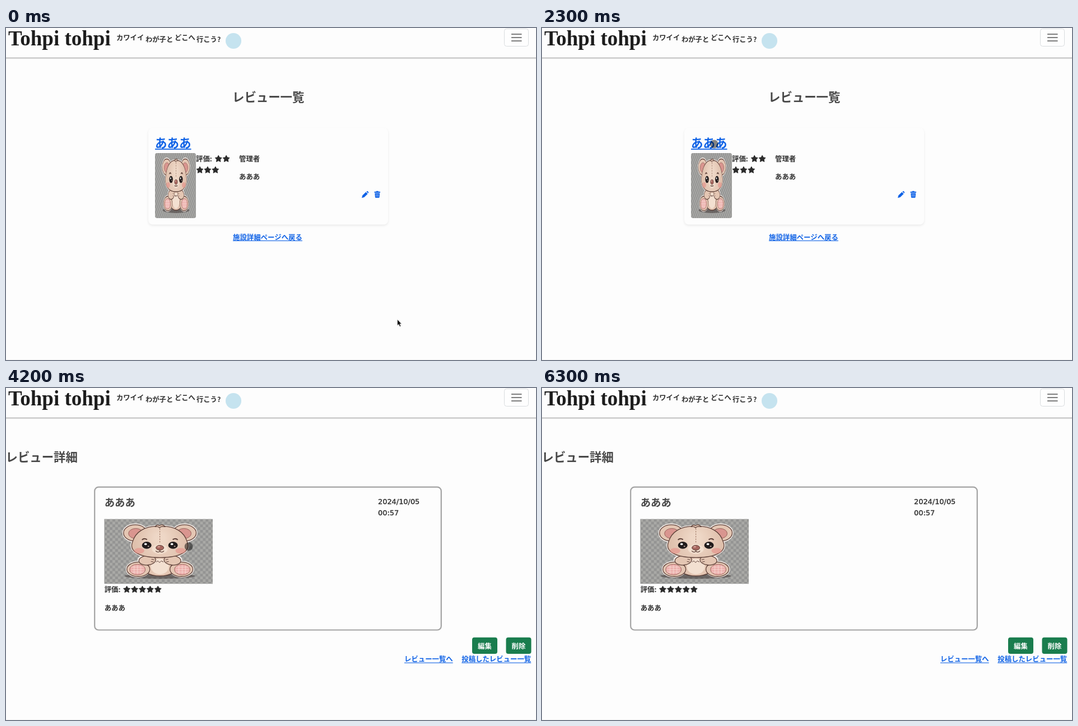
These frames come from a looping animation (946 by 592 pixels, 6.4 s). An HTML page with a canvas:

```html
<!DOCTYPE html>
<html lang="ja">
<head>
<meta charset="utf-8">
<title>レビュー</title>
<style>
html, body { margin: 0; width: 100%; height: 100%; overflow: hidden; background: #fdfdfd; }
canvas { display: block; }
</style>
</head>
<body>
<canvas id="stage" width="946" height="592"></canvas>
<script>
const ctx = document.getElementById('stage').getContext('2d');
const LOOP = 6400, STEP = 100, PAGE_CHANGE = 2600;
const SANS = '"Noto Sans CJK JP", "Noto Sans CJK", sans-serif';
const BLUE = '#0f62e6', DARK = '#303030', TITLE = '#484848';
const BODY = 12.4;

// Japanese text placed by its left edge and vertical centre
function text(str, x, y, size = BODY, color = DARK) {
  ctx.font = `bold ${size}px ${SANS}`;
  ctx.fillStyle = color;
  ctx.fillText(str, x, y + size * 0.38);
}

function link(str, x, y, size = BODY) {
  text(str, x, y, size, BLUE);
  ctx.fillRect(x, y + size * 0.47, ctx.measureText(str).width, size > 16 ? 1.8 : 1.1);
}

function box(x, y, w, h, r, fill, stroke, lineWidth = 1) {
  ctx.beginPath();
  ctx.roundRect(x, y, w, h, r);
  if (fill) { ctx.fillStyle = fill; ctx.fill(); }
  if (stroke) { ctx.strokeStyle = stroke; ctx.lineWidth = lineWidth; ctx.stroke(); }
}

function oval(x, y, rx, ry, fill, stroke, lineWidth = 1.3, turn = 0) {
  ctx.beginPath();
  ctx.ellipse(x, y, rx, ry, turn, 0, Math.PI * 2);
  if (fill) { ctx.fillStyle = fill; ctx.fill(); }
  if (stroke) { ctx.strokeStyle = stroke; ctx.lineWidth = lineWidth; ctx.stroke(); }
}

function path(d, fill, stroke, lineWidth = 1) {
  const shape = new Path2D(d);
  if (fill) { ctx.fillStyle = fill; ctx.fill(shape); }
  if (stroke) { ctx.strokeStyle = stroke; ctx.lineWidth = lineWidth; ctx.stroke(shape); }
}

function at(x, y, draw) {
  ctx.save();
  ctx.translate(x, y);
  draw();
  ctx.restore();
}

function stars(x, y, count) {
  ctx.fillStyle = ctx.strokeStyle = '#2b2b2b';
  ctx.lineWidth = 1;
  ctx.lineJoin = 'round';
  for (let n = 0; n < count; n++) {
    ctx.beginPath();
    for (let i = 0; i < 10; i++) {
      const r = i % 2 ? 3.2 : 6.3, a = i * Math.PI / 5 - Math.PI / 2;
      ctx.lineTo(x + n * 13.9 + r * Math.cos(a), y + 0.4 + r * Math.sin(a));
    }
    ctx.closePath();
    ctx.fill();
    ctx.stroke();
  }
}

// Teddy picture, designed at 194 x 116 and stretched into the given box
function teddy(x, y, w, h, radius) {
  const FUR = '#e4c6b3', LINE = '#5d4038', RIM = '#f3ebe6', MID = 99.5;
  const HEAD = 'M99.5 13C128 12 143 24 148 40C156 58 136 69 99.5 69C63 69 43 58 51 40C56 24 71 12 99.5 13Z';
  const sides = draw => [-1, 1].forEach(s => draw(s, d => MID + s * d));
  ctx.save();
  ctx.beginPath();
  ctx.roundRect(x, y, w, h, radius);
  ctx.clip();
  ctx.translate(x, y);
  ctx.scale(w / 194, h / 116);

  ctx.fillStyle = '#949493';
  ctx.fillRect(0, 0, 194, 116);
  ctx.fillStyle = '#a9a9a6';
  for (let row = 0; row < 24; row++)
    for (let col = row % 2; col < 40; col += 2) ctx.fillRect(col * 4.9, row * 4.9, 4.9, 4.9);
  oval(MID, 102, 63, 5, 'rgba(70,62,60,.6)');

  // pale rim around the silhouette
  sides((s, px) => {
    oval(px(44), 25, 21, 15, RIM, RIM, 4);
    oval(px(39), 90, 20, 13, RIM, RIM, 4);
    oval(px(23), 74, 15, 9, RIM, RIM, 4);
  });
  path(HEAD, RIM, RIM, 4);

  sides((s, px) => {
    oval(px(44), 25, 21, 14.5, FUR, LINE);
    oval(px(43), 26, 13, 9, '#d9958f', '#97645c', 1);
  });
  oval(MID, 82, 34, 20, FUR, LINE);
  oval(MID, 85, 16, 14, '#f3e0d1');
  sides((s, px) => {
    oval(px(38.5), 90, 20.5, 13, FUR, LINE);
    oval(px(40), 90.5, 14, 9.5, '#ecb0ad', '#9e675f', 1);
    for (let i = -1; i < 2; i++) {
      path(`M${px(40) + i * 6} 83v15M${px(40) - 11} ${90.5 + i * 4.5}h22`, null, 'rgba(250,224,218,.75)');
    }
    oval(px(22.5), 74, 15, 8.5, FUR, LINE, 1.3, s * 0.08);
    path(`M${px(10)} 73l${s * 5} -1M${px(11)} 77l${s * 5} -1`, null, LINE);
  });
  path('M93 77l3 -2l3 3l3 -3l4 2', null, LINE);

  const fur = ctx.createRadialGradient(MID, 34, 8, MID, 42, 54);
  fur.addColorStop(0, '#eed7c6');
  fur.addColorStop(1, '#dcbba7');
  path(HEAD, fur, LINE, 1.3);
  path('M91 14Q94 9 99 12Q104 8 109 14Q102 12 99 16Q95 12 91 14Z', FUR, LINE, 1.2);
  ctx.setLineDash([2.5, 2]);
  path('M99.5 17V44', null, '#99705f');
  ctx.setLineDash([]);

  oval(MID, 54, 14, 8.5, '#f2dfcf');
  sides((s, px) => {
    oval(px(37), 57, 9, 5, 'rgba(231,144,137,.6)');
    oval(px(23.5), 47, 8.5, 6.3, '#211b1b');
    oval(px(23.5) - 2, 45, 2.4, 1.8, '#fff');
    oval(px(23.5) + 3, 49, 1.5, 1.1, '#bba69e');
    path(`M${px(23)} 37Q${px(28)} 33.5 ${px(32)} 37.5`, null, LINE, 2);
  });
  oval(MID, 51.5, 7, 4.3, '#a7665e', LINE, 1);
  oval(97.5, 50, 2.5, 1, '#e3b1a6');
  path('M99.5 55.5V58M92 57Q96 61 99.5 58Q103 61 107 57', null, LINE, 1.3);
  ctx.restore();
}

function header() {
  ctx.font = 'bold 37px "Liberation Serif", serif';
  ctx.fillStyle = '#1d1d1d';
  ctx.fillText('Tohpi tohpi', 4, 31);
  text('カワイイ', 197, 17, 12.3);
  text('わが子と', 249, 20, 12.3);
  text('どこへ', 301, 17, 12.3);
  text('行こう?', 340, 20, 12.3);
  oval(406, 23, 14, 14, '#c5e3ef');

  box(889.5, 1.5, 43, 31, 4, '#fefefe', '#d9dcdf');
  ctx.fillStyle = '#555';
  for (const y of [10.3, 16.3, 22.3]) ctx.fillRect(902, y, 18.5, 1.5);

  ctx.fillStyle = '#b9b9b9';
  ctx.fillRect(0, 52.6, 946, 1.8);
  ctx.fillStyle = '#e9e9e9';
  ctx.fillRect(0, 54.4, 946, 1);
  ctx.fillStyle = '#f3f3f3';
  ctx.fillRect(0, 591, 946, 1);
}

function listPage() {
  text('レビュー一覧', 404, 123, 21.4, TITLE);

  ctx.save();
  ctx.shadowColor = 'rgba(0,0,0,.08)';
  ctx.shadowBlur = 4;
  ctx.shadowOffsetY = 2;
  box(254, 178, 428, 172.5, 8, '#fdfdfd');
  ctx.restore();

  link('あああ', 266, 205, 21.5);
  teddy(266, 223, 73, 116, 4);
  text('評価:', 339, 233);
  stars(379.2, 233, 2);
  stars(346, 253, 3);
  text('管理者', 416, 233);
  text('あああ', 416, 265.5);

  at(641, 297, () => {
    path('M-6 6L-4.8 1.6L1.4 -4.4L4.6 -1.2L-1.6 4.8ZM2.3 -5.2L3.4 -6.1Q4 -6.5 4.6 -6L6 -4.6Q6.5 -4 6 -3.4L5.3 -2.2Z', BLUE);
  });
  at(662.7, 296.8, () => {
    path('M-5.2 -5H-2V-6H2V-5H5.2V-3H-5.2ZM-4.4 -2.3H4.4L3.8 5Q3.7 6 2.8 6H-2.8Q-3.7 6 -3.8 5Z', BLUE);
    path('M-1.9 -.7V4M0 -.7V4M1.9 -.7V4', null, '#b5cff8', 0.7);
  });
  link('施設詳細ページへ戻る', 405, 373);
}

function dateLine(str, y) {
  ctx.font = '12.9px "DejaVu Sans", sans-serif';
  ctx.fillStyle = ctx.strokeStyle = DARK;
  ctx.lineWidth = 0.4;
  ctx.fillText(str, 664, y);
  ctx.strokeText(str, 664, y);
}

function detailPage() {
  text('レビュー詳細', -0.5, 123, 21.4, TITLE);
  box(158.2, 176.7, 618.6, 254.8, 7, null, '#a3a3a3', 2.2);
  text('あああ', 175.7, 204, 18.4, TITLE);
  dateLine('2024/10/05', 207);
  dateLine('00:57', 226.5);

  teddy(175.3, 233.5, 193.7, 115.7, 0);
  text('評価:', 175.7, 359);
  stars(215.6, 359, 5);
  text('あああ', 175.7, 392);

  box(832, 444.8, 45, 29.2, 4, '#1a7d4e');
  box(892.5, 444.8, 45, 29.2, 4, '#1a7d4e');
  text('編集', 842.1, 459.8, BODY, '#fff');
  text('削除', 902.6, 459.8, BODY, '#fff');
  link('レビュー一覧へ', 711, 483.7);
  link('投稿したレビュー一覧', 813.3, 483.7);
}

// Pointer stops: time, x, y
const ROUTE = [
  [0, 699, 520], [700, 699, 520], [1300, 527, 388], [2200, 307.3, 207], [4000, 307.3, 207],
  [4700, 373, 472], [5000, 373, 472], [5800, 500, -12], [LOOP, 500, -12]
];

function pointer(t) {
  if (t < STEP) {
    at(698, 519, () => path('M.4 .5V11.8L3 9.5L4.8 13.6L6.9 12.7L5.1 8.8H8.3Z', '#111', '#fff', 0.7));
    return;
  }
  const i = ROUTE.findIndex(stop => stop[0] > t);
  const [t0, x0, y0] = ROUTE[i - 1], [t1, x1, y1] = ROUTE[i];
  const k = (t - t0) / (t1 - t0);
  oval(x0 + (x1 - x0) * k, y0 + (y1 - y0) * k, 7.4, 7.4, 'rgba(0,0,0,.48)');
}

function frame() {
  const t = Math.floor(performance.now() % LOOP / STEP) * STEP;
  ctx.fillStyle = '#fdfdfd';
  ctx.fillRect(0, 0, 946, 592);
  header();
  if (t < PAGE_CHANGE) listPage(); else detailPage();
  pointer(t);
  requestAnimationFrame(frame);
}
frame();
</script>
</body>
</html>
```
